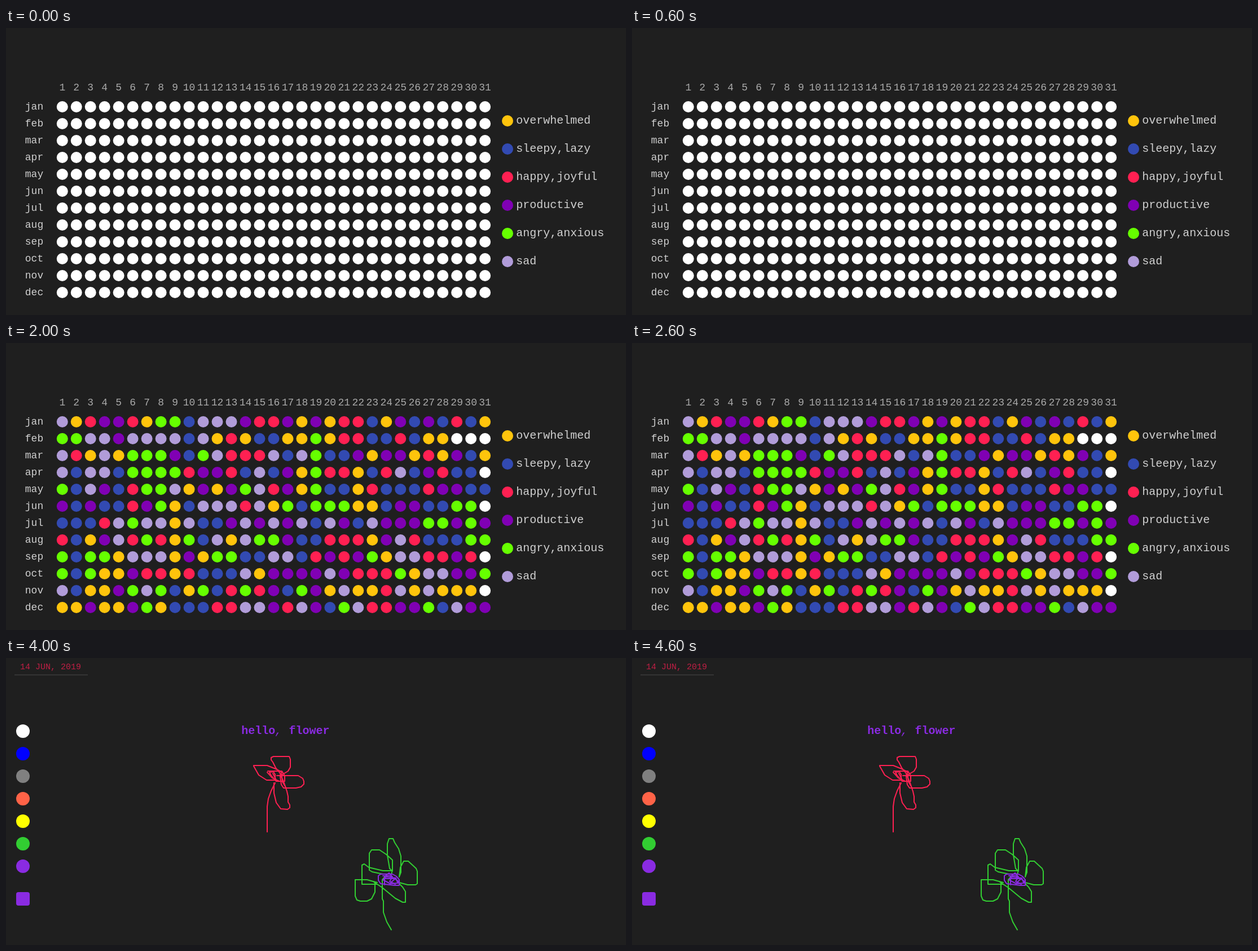
Recreate the animation shown at these times as an HTML page. Size 1099 by 510 pixels, loop 5000 ms.

```html
<!DOCTYPE html>
<html lang="en">
<head>
<meta charset="utf-8">
<title>Mood year</title>
<style>
  html, body { margin: 0; width: 100%; height: 100%; overflow: hidden; background: #1f1f1f; }
  svg { display: block; width: 100%; height: 100%; }
  text { font-family: "Liberation Mono", "Courier New", monospace; white-space: pre; }
</style>
</head>
<body>
<svg id="stage" viewBox="0 0 1099 510"></svg>
<script>
const NS = 'http://www.w3.org/2000/svg';
const stage = document.getElementById('stage');
const STEP = 1000;
const SCENES = 5;

const MOODS = {
  o: ['#ffc40c', 'overwhelmed'],
  z: ['#324ab2', 'sleepy,lazy'],
  h: ['#ff2052', 'happy,joyful'],
  p: ['#8000b4', 'productive'],
  a: ['#66ff00', 'angry,anxious'],
  s: ['#b19cd9', 'sad']
};
const MONTHS = 'jan feb mar apr may jun jul aug sep oct nov dec'.split(' ');
const JULY = 'hphzaossopphzpaphhhzohpphzposos';
// One mood letter per day; a missing day stays white.
const YEAR = [
  'sohpphoaazsssphhpopohhzopzpzhzo',
  'aasspsssszsohozzooaohhzzhzoo',
  'shosoaaapzashhhszsazzpoppohopzo',
  'szsszaaaahpphzszpoahhozhszphzz',
  'azspzhaasopopashpoazzohzzzhppzz',
  'pzpzzhpaozssshsoazaaaoozppzzaa',
  'zzzhsassoszzpspspszspzspppaapap',
  'hzopshahoazsosaapzzhhhopshzzzaa',
  'azaaosssopoaazzsszhphpaosshhph',
  'azaoophhohzzzsoppppsphhhaossppa',
  'szoopasazoazhahpzaposoohsosooo',
  'oopoopaozzzhhssphspzashhppazspp'
];
const PALETTE = ['#ffffff', '#0000ff', '#808080', '#ff6347', '#ffff00', '#32cd32', '#8a2be2'];

function add(parent, tag, attrs, content) {
  const el = document.createElementNS(NS, tag);
  for (const key in attrs) el.setAttribute(key, attrs[key]);
  if (content) el.textContent = content;
  parent.appendChild(el);
  return el;
}

const group = () => add(stage, 'g', {});
const dot = (g, cx, cy, r, fill) => add(g, 'circle', { cx, cy, r, fill });

function label(g, x, y, size, fill, content, anchor = 'start', extra = {}) {
  return add(g, 'text', { x, y, 'font-size': size, fill, 'text-anchor': anchor, ...extra }, content);
}

function draw(g, color, strokes) {
  add(g, 'path', {
    d: strokes.join(' '), fill: 'none', stroke: color, 'stroke-width': 2,
    'stroke-linecap': 'round', 'stroke-linejoin': 'round'
  });
}

const back = add(stage, 'rect', { width: 1099, height: 510 });

// Calendar
const calendar = group();
const dayX = i => 99.8 + 24.977 * i;
for (let d = 0; d < 31; d++) label(calendar, dayX(d), 111, 18, '#aaaaaa', d + 1, 'middle');
const days = MONTHS.map((name, m) => {
  const y = 140 + 30 * m;
  label(calendar, 50, y + 5, 18, '#d0d0d0', name, 'middle');
  return Array.from({ length: 31 }, (_, d) => dot(calendar, dayX(d), y, 10, '#ffffff'));
});
Object.values(MOODS).forEach(([color, name], i) => {
  const y = 165 + 50 * i;
  dot(calendar, 889, y, 10, color);
  label(calendar, 904.3, y + 5, 20, '#d0d0d0', name);
});

// Sketch page shared by both drawings
const page = group();
add(page, 'path', { d: 'M15 30H145', stroke: '#343434', 'stroke-width': 2 });
PALETTE.forEach((color, i) => dot(page, 30, 130 + 40 * i, 12, color));
const brush = add(page, 'rect', { x: 18, y: 416, width: 24, height: 24, rx: 4 });
const date = label(page, 79, 20, 15, '#fff', '', 'middle');

const small = group();
label(small, 510.3, 275, 20, '#8000b4', 'hello');
draw(small, '#ffff00', [
  'M341 274L343 273V262L345 260V248L347 244V240L350 228V222',
  'M336 202H352L354 207V216L351 222H347L343 215L340 208L336 204Z',
  'M354 215V205L358 202H374V207L368 208L357 214',
  'M362 210H370L373 207H385V213L380 215H356M362 212L368 211',
  'M356 217H373L379 222L383 232H371L362 227L355 219',
  'M357 220H365L369 223V246H360L354 243L351 235V227L348 222V227L350 230'
]);

const large = group();
const bold = { 'font-weight': 'bold' };
label(large, 417.3, 135, 20, '#8a2be2', 'hello', 'start', bold);
label(large, 477, 135, 20, '#8a2be2', ',', 'start', { 'font-style': 'italic' });
label(large, 501.5, 135, 20, '#8a2be2', 'flower', 'start', bold);
draw(large, '#ff2052', [
  'M490 207L500 201L504 194V180L502 175H474L470 177V181L473 185L478 195L486 205',
  'M480 217H462L448 208L439 192V191H463L478 197L489 203',
  'M480 209H518L526 214L528 219V224L523 229L514 231H492L488 225L486 210',
  'M475 222V240L479 257L487 268L499 269L503 266V261L500 256V246L498 237L493 222L486 206',
  'M464 201H489L494 209V219H479L470 209L467 203L474 202L477 207V214',
  'M463 203L472 213L484 219M488 202L490 220L496 230M473 205L479 217',
  'M463 309V264L465 250L470 236L477 222'
]);
draw(large, '#32cd32', [
  'M684 378L680 374L676 350V330L679 321H686L689 328L696 339L700 352V381L697 389',
  'M697 389L699 372L705 361H713L727 374L729 379V401L726 403H712L697 399',
  'M685 378V359L674 349L662 341H648L644 347V377L649 380L668 384',
  'M658 402H631V368L635 366L643 372L668 378H685L682 386',
  'M658 399L640 394H619V423L622 430L628 432H640L648 428L654 416V400',
  'M652 398L667 408L690 427L703 434H708V415L703 407L697 401',
  'M683 483L675 469L669 452V432L667 428V394L672 388'
]);
draw(large, '#8a2be2', [
  'M660 387L664 384H685L692 388L697 394V404H688L664 401L660 395Z',
  'M668 387H680L695 396V400L681 401L668 394L674 389L691 391L694 399',
  'M671 403V388L679 382L685 389L680 397L690 402M672 392H690L682 399'
]);

function fillDays(table) {
  days.forEach((row, m) => row.forEach((el, d) => {
    const mood = MOODS[(table[m] || '')[d]];
    el.setAttribute('fill', mood ? mood[0] : '#ffffff');
  }));
}

function setPage(text, ink, paint) {
  date.textContent = text;
  date.setAttribute('fill', ink);
  brush.setAttribute('fill', paint);
}

const show = (el, on) => el.setAttribute('display', on ? 'inline' : 'none');

let current = -1;
function setScene(n) {
  if (n === current) return;
  current = n;
  back.setAttribute('fill', n === 1 ? '#232323' : '#1f1f1f');
  show(calendar, n < 3);
  show(page, n >= 3);
  show(small, n === 3);
  show(large, n === 4);
  if (n < 3) fillDays([[], { 6: JULY }, YEAR][n]);
  else if (n === 3) setPage('25 JUN, 2019', '#560c78', '#ffff00');
  else setPage('14 JUN, 2019', '#c01f45', '#8a2be2');
}

const start = performance.now();
function tick() {
  setScene(Math.floor((performance.now() - start) / STEP) % SCENES);
  requestAnimationFrame(tick);
}
tick();
</script>
</body>
</html>
```
